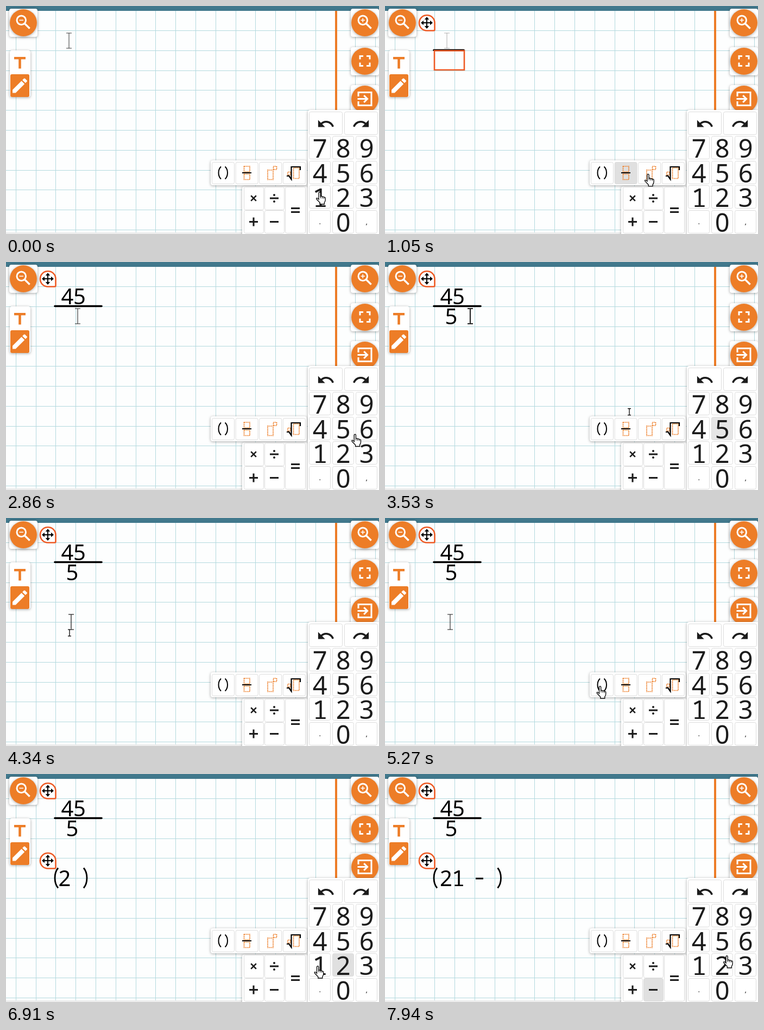
Animation, 687 px wide and 421 px high, one loop 8 s. Source, as an HTML page with a canvas:

```html
<!DOCTYPE html>
<html lang="en">
<head>
<meta charset="utf-8">
<title>Math pad</title>
<style>
html, body { margin: 0; width: 100%; height: 100%; overflow: hidden; background: #fff; }
canvas { display: block; width: 687px; height: 421px; }
</style>
</head>
<body>
<canvas id="stage" width="687" height="421"></canvas>
<script>
const ctx = document.getElementById('stage').getContext('2d');
const LOOP = 8000, STEP = 136.4, CELL = 36.8;
const ORANGE = '#ed7d27', RED = '#ee5a24', INK = '#1c1c1c', BLACK = '#000', WHITE = '#fff';
const HAND = new Path2D('M5 2.5Q5 .7 6.6 .7Q8.2 .7 8.2 2.5V8.6Q9.8 7.4 11.2 9.2Q13 8.3 14.2 10Q16 9.3 17.2 11.2V15.5Q17 18 15.3 19.8V23H7.3V20.3L1.2 14Q.2 12.3 1.4 11.7Q2.6 11.3 5 14z');

const KEYS = {};
const addKey = (name, x, y, w, h) => KEYS[name] = { x, y, w, h };
[...'789456123.0,'].forEach((c, i) => addKey(c, 558 + i % 3 * 43, Math.round(240 + Math.floor(i / 3) * 45.6), 39, 42));
['paren', 'frac', 'pow', 'root'].forEach((name, i) => addKey(name, 379 + i * 43.6, 288, 41, 40));
['times', 'divide', 'plus', 'minus'].forEach((name, i) => addKey(name, 438 + i % 2 * 38, i < 2 ? 334 : 377, 36, 42));
addKey('equals', 514, 334, 37, 85);
addKey('undo', 558, 195, 61, 42);
addKey('redo', 623, 195, 61, 42);

const PLACES = { start: [577, 343], slot: [128, 81], field: [117, 212], passSix: [668, 326], passFour: [565, 306], end: [629, 335] };

// Pointer stops: where, step of arrival, step of leaving; a key is pressed just before leaving
const STOPS = [['start', 0, 0], ['frac', 4, 7], ['4', 10, 11], ['5', 12, 13], ['slot', 14, 17],
  ['passSix', 20, 20], ['5', 22, 24], ['field', 30, 32], ['paren', 39, 42], ['passFour', 44, 44],
  ['2', 46, 50], ['1', 51, 53], ['minus', 55, 57], ['end', 58, 60]
].map(([name, arrive, leave]) => {
  const key = KEYS[name];
  const [x, y] = key ? [key.x + key.w / 2 - 4, key.y + key.h / 2 + 2] : PLACES[name];
  return { name, arrive, leave, x, y };
});

function local(x, y, draw, scaleX = 1, scaleY = 1) {
  ctx.save();
  ctx.translate(x, y);
  ctx.scale(scaleX, scaleY);
  draw();
  ctx.restore();
}

// points: x, y, x, y, ...
function trace(points) {
  ctx.beginPath();
  for (let i = 0; i < points.length; i += 2) ctx.lineTo(points[i], points[i + 1]);
}

function line(points, width, color = INK) {
  trace(points);
  ctx.lineWidth = width;
  ctx.strokeStyle = color;
  ctx.stroke();
}

function poly(points, color) {
  trace(points);
  ctx.fillStyle = color;
  ctx.fill();
}

function quarters(draw) {
  for (let i = 0; i < 4; i++) {
    draw();
    ctx.rotate(Math.PI / 2);
  }
}

function arc(x, y, r, width, color, from = 0, to = 2 * Math.PI) {
  ctx.beginPath();
  ctx.arc(x, y, r, from, to);
  ctx.lineWidth = width;
  ctx.strokeStyle = color;
  ctx.stroke();
}

function disc(x, y, r, color) {
  ctx.beginPath();
  ctx.arc(x, y, r, 0, 2 * Math.PI);
  ctx.fillStyle = color;
  ctx.fill();
}

function box(x, y, w, h, r, fill, stroke, width = 1) {
  ctx.beginPath();
  ctx.roundRect(x, y, w, h, r);
  ctx.fillStyle = fill;
  ctx.fill();
  if (!stroke) return;
  ctx.strokeStyle = stroke;
  ctx.lineWidth = width;
  ctx.stroke();
}

function shadowed(draw) {
  ctx.save();
  ctx.shadowColor = 'rgba(0,0,0,.35)';
  ctx.shadowBlur = 5;
  ctx.shadowOffsetY = 1;
  draw();
  ctx.restore();
}

const card = (x, y, w, h) => shadowed(() => box(x, y, w, h, 4, WHITE));

function dotted(x, y, w, h) {
  ctx.setLineDash([2, 1]);
  ctx.lineWidth = 1.7;
  ctx.strokeStyle = ORANGE;
  ctx.strokeRect(x, y, w, h);
  ctx.setLineDash([]);
}

// The one with a foot comes from the monospaced cut
function digit(c, x, base, size, color = INK) {
  ctx.font = `${size}px ${c === '1' ? '"Noto Sans Mono", monospace' : '"Noto Sans", sans-serif'}`;
  ctx.textAlign = 'center';
  ctx.fillStyle = color;
  ctx.fillText(c, x, base);
}

function paren(x, y, dir, w, h, width) {
  ctx.beginPath();
  ctx.moveTo(x + dir * w, y - h);
  ctx.bezierCurveTo(x - dir * w / 3, y - h / 2, x - dir * w / 3, y + h / 2, x + dir * w, y + h);
  ctx.lineWidth = width;
  ctx.strokeStyle = BLACK;
  ctx.stroke();
}

function paper() {
  ctx.fillStyle = '#fdfefe';
  ctx.fillRect(0, 0, 687, 421);
  for (let i = 0; i < 19; i++) {
    const x = Math.floor(18.3 + i * CELL) + .5, y = Math.floor(45.45 + i * CELL) + .5;
    line([x, 8, x, 421], 1, '#b3d9de');
    line([0, y, 687, y], 1, '#b3d9de');
  }
  ctx.fillStyle = '#ececec';
  ctx.fillRect(0, 418, 687, 3);
  ctx.fillStyle = ORANGE;
  ctx.fillRect(606, 9, 4, 184);
  ctx.fillStyle = '#41788c';
  ctx.fillRect(0, 0, 687, 9);
}

function lens(plus) {
  arc(-3.75, -4.25, 8.25, 3, WHITE);
  line([2.5, 2, 11.6, 11], 3.4, WHITE);
  line([-7.5, -4.25, 0, -4.25], 1.6, WHITE);
  if (plus) line([-3.75, -8, -3.75, -.5], 1.6, WHITE);
}

function corners() {
  quarters(() => line([-9, -3, -9, -9, -3, -9], 3, WHITE));
}

function exit() {
  line([-12, -4.5, -12, -12, 12, -12, 12, 12, -12, 12, -12, 4.5], 3, WHITE);
  line([-13.5, 0, 4, 0], 3, WHITE);
  line([-1.8, -6.4, 4.6, 0, -1.8, 6.4], 3, WHITE);
}

function pen() {
  ctx.rotate(-Math.PI / 4);
  poly([-19, 0, -15, -4, 8.3, -4, 8.3, 4, -15, 4], WHITE);
  box(10.6, -4, 5.4, 8, [0, 1.5, 1.5, 0], WHITE);
}

function arrowBack() {
  poly([-10.5, -5, -10.5, 4, -1.5, 4], INK);
  arc(0, 6.5, 9.25, 2.5, INK, -Math.PI * .76, -Math.PI * .1);
}

function roundButton(x, y, icon) {
  card(x - 26, y - 26, 52, 52);
  shadowed(() => disc(x, y, 25, ORANGE));
  local(x, y - .5, icon);
}

function tools() {
  roundButton(32, 31, () => lens(false));
  roundButton(661, 31, () => lens(true));
  roundButton(661, 102, corners);
  roundButton(661, 172, exit);
  card(7, 82, 38, 86);
  line([15, 96.2, 36, 96.2], 4.4, ORANGE);
  line([25.5, 96, 25.5, 115.5], 4.6, ORANGE);
  box(8, 126, 35, 42, 3, ORANGE);
  local(25.5, 147, pen);
}

function keypad(glow) {
  card(435, 333, 121, 100);
  card(377, 285, 177, 46);
  card(556, 192, 140, 240);
  for (const name in KEYS) {
    const { x, y, w, h } = KEYS[name], v = 255 - 31 * glow(name);
    box(x + .5, y + .5, w, h, 3, `rgb(${v},${v},${v})`, '#dcdcdc');
    if (/\d/.test(name)) digit(name, x + 20.3, y + 39.5, 47);
    else if (/[.,]/.test(name)) digit(name, x + 20.3, y + 26, 13);
  }
  local(589.8, 217.7, arrowBack, 1.42, 1.42);
  local(653.2, 217.7, arrowBack, -1.42, 1.42);
}

function functions() {
  paren(391.5, 308, 1, 4.5, 11.5, 2);
  paren(408, 308, -1, 4.5, 11.5, 2);
  dotted(438.5, 296, 10.5, 10);
  dotted(438.5, 310.5, 10.5, 10);
  line([435, 308, 452, 308], 2, BLACK);
  dotted(482, 303, 10, 17.5);
  dotted(492.5, 296, 6, 6);
  dotted(519, 306.5, 5, 5.5);
  dotted(529.5, 299, 10.5, 19.5);
  line([517, 314, 521, 313.5, 525.5, 320, 525.5, 297, 542, 297, 542, 303], 2.2, BLACK);
}

function operators() {
  const bar = () => line([-8, 0, 8, 0], 3.1);
  const cross = () => {
    bar();
    line([0, -8, 0, 8], 3.1);
  };
  local(456, 398.5, cross);
  local(456, 355, () => {
    ctx.rotate(Math.PI / 4);
    cross();
  }, .85, .85);
  local(494, 398.5, bar);
  local(494, 355, bar);
  disc(494, 349, 2, INK);
  disc(494, 361, 2, INK);
  local(533, 373.5, bar);
  local(533, 380.5, bar);
}

function handle(x, y) {
  box(x - 14, y - 14, 28.5, 28.5, [14, 14, 2, 14], WHITE, RED, 2.6);
  local(x, y, () => quarters(() => {
    line([0, 0, 0, -7], 2, BLACK);
    poly([0, -11, 4.2, -6, -4.2, -6], BLACK);
  }));
}

function typed(s, x, base) {
  [...s].forEach((c, i) => {
    if (c === '-') line([167, base - 14, 181, base - 14], 3, BLACK);
    else digit(c, x + i * 22.5, base, 40, BLACK);
  });
}

// What has been entered after the first `done` stops, and where the caret is
function entered(done) {
  const page = { top: null, under: '', bracket: null, slot: 'none' };
  for (const { name } of done) {
    if (name === 'frac') page.top = '', page.slot = 'top';
    else if (name === 'slot') page.slot = 'under';
    else if (name === 'field') page.slot = 'field';
    else if (name === 'paren') page.bracket = '', page.slot = 'bracket';
    else if (name === 'minus') page.bracket += ' - ';
    else if (KEYS[name]) page[page.slot] += name;
  }
  return page;
}

function formulas({ top, under, bracket, slot }) {
  if (top !== null) {
    const wide = top.length > 1;
    handle(77, 31);
    ctx.lineCap = 'round';
    line([90, 81.5, wide ? 176 : 145, 81.5], 3.6, BLACK);
    ctx.lineCap = 'butt';
    typed(top, 113, 78);
    typed(under, 122, 115);
    if (slot === 'top') box(wide ? 123.5 : 91, 82.5, 55, 35.5, 0, 'transparent', RED, 2.6);
  }
  if (bracket !== null) {
    const n = Math.min(bracket.length, 4);
    handle(77, 160);
    paren(90, 192, 1, 6, 18.5, 2.8);
    paren(149 + 21.5 * Math.max(0, n - 1), 192, -1, 6, 18.5, 2.8);
    typed(bracket, n > 1 ? 112.5 : 108, 207);
  }
}

function caret(page, t) {
  const homes = { none: [116, 64], top: [114, 64], under: [132, 100], field: [120, 192], bracket: [100, 192] };
  const [home, y] = homes[page.slot];
  const x = home + 25 * Math.min((page[page.slot] || '').length, 4);
  ctx.globalAlpha = .5 - .5 * Math.cos((t - 6940) / 960 * 2 * Math.PI);
  line([x, y - 14, x, y + 14], 2.2, '#222');
  for (const end of [y - 14, y + 14]) line([x - 5, end, x + 5, end], 2, '#222');
  ctx.globalAlpha = 1;
}

function pointerAt(k) {
  const next = STOPS.findIndex(s => k <= s.leave), b = STOPS[next];
  if (k >= b.arrive) return [b.x, b.y];
  const a = STOPS[next - 1], p = (k - a.leave) / (b.arrive - a.leave);
  return [a.x + (b.x - a.x) * p, a.y + (b.y - a.y) * p];
}

function pointer(k) {
  const [x, y] = pointerAt(k);
  const overPad = (x > 556 && y > 192) || (x > 377 && y > 284);
  const overSlot = x < 180 && y < 118;
  if (overPad || overSlot) {
    local(x - 6, y, () => {
      ctx.fillStyle = WHITE;
      ctx.fill(HAND);
      ctx.strokeStyle = BLACK;
      ctx.lineWidth = 1.3;
      ctx.stroke(HAND);
      for (let i = 0; i < 3; i++) line([8.5 + 3 * i, 9 + i / 2, 8.5 + 3 * i, 12 + i / 2], 1, BLACK);
    });
  } else {
    for (const [w, color] of [[3, WHITE], [1.3, BLACK]]) {
      line([x, y - 6, x, y + 6], w, color);
      for (const end of [y - 6, y + 6]) line([x - 3, end, x + 3, end], w, color);
    }
  }
}

function draw(t) {
  const k = Math.floor((t + 70) / STEP);
  const glow = name => {
    const press = STOPS.findLast(s => s.name === name && s.leave - 1 <= k);
    return press ? Math.max(0, Math.min(1, (5 - (k - press.leave + 1)) / 2.5)) : 0;
  };
  const page = entered(STOPS.filter(s => s.leave <= k));
  paper();
  tools();
  keypad(glow);
  functions();
  operators();
  formulas(page);
  caret(page, t);
  pointer(k);
}

let begin;
function tick(now) {
  begin ??= now;
  draw((now - begin) % LOOP);
  requestAnimationFrame(tick);
}
requestAnimationFrame(tick);
</script>
</body>
</html>
```
